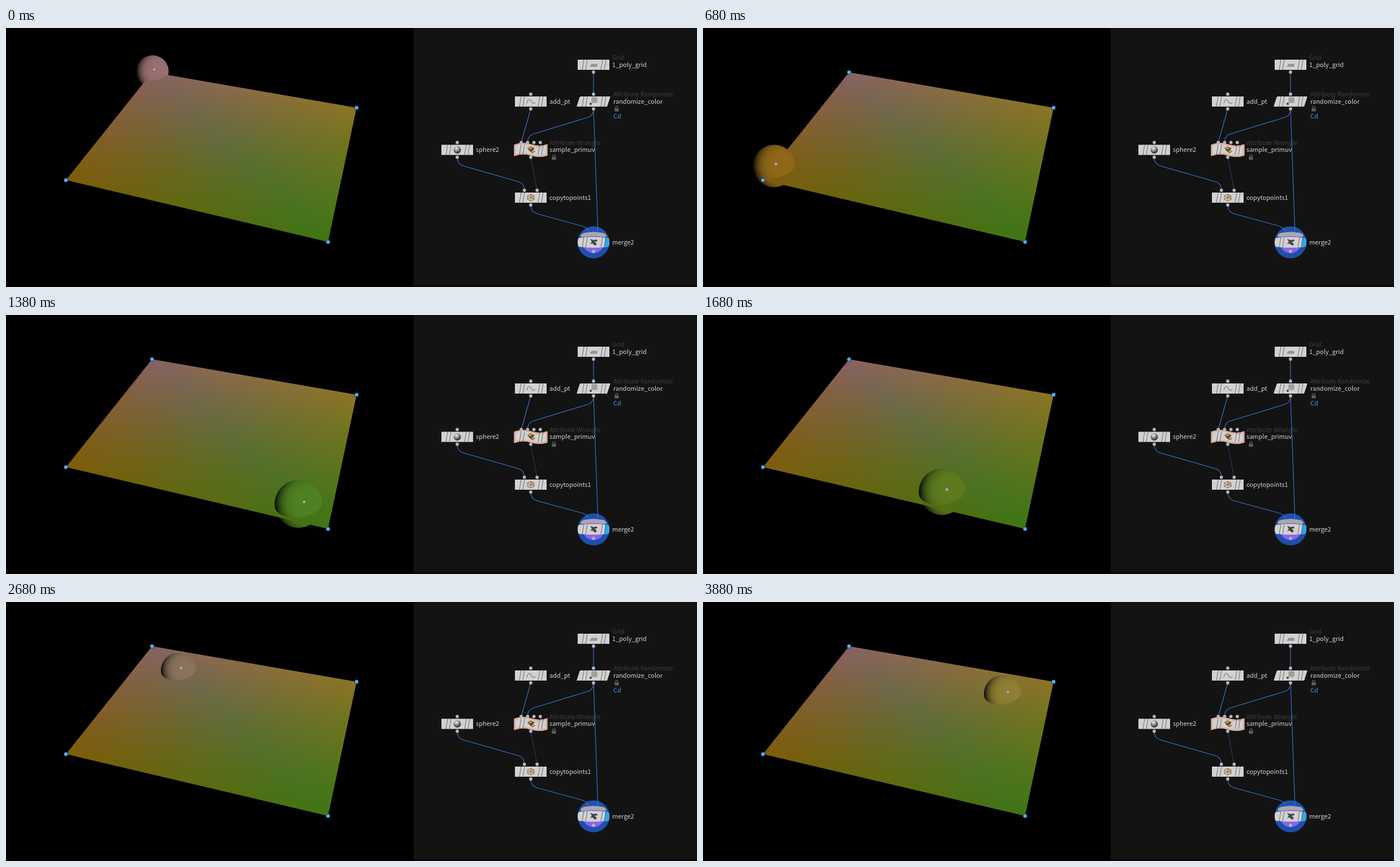
An HTML page with a canvas that plays this animation: 1222 px wide and 458 px high, repeating every 3980 ms.

```html
<!DOCTYPE html>
<html lang="en">
<head>
<meta charset="utf-8">
<title>Sampling a colour on a grid</title>
<style>
  html, body { margin: 0; width: 100%; height: 100%; overflow: hidden; background: #000; }
  canvas, svg { position: absolute; left: 0; top: 0; display: block; }
  text { font: 11px "Noto Sans CJK JP", "Noto Sans CJK SC", "Noto Sans", sans-serif; fill: #d2d2d2; }
  .type { fill: #3f3f3f; }
  .note { fill: #3f95ff; }
  .wire { fill: none; stroke: #3778d8; stroke-width: 1.1; }
  .dotted { stroke-dasharray: 1.5 2; }
  .body { fill: #d1d1d1; }
  .active .body { fill: #ffa51f; }
  .port { fill: #b4b4b4; }
  .line { fill: none; stroke: #000; stroke-opacity: .55; stroke-width: .9; }
</style>
</head>
<body>
<canvas id="view" width="721" height="458"></canvas>
<svg width="1222" height="458" viewBox="0 0 1222 458">
  <defs>
    <radialGradient id="ball" cx=".4" cy=".3" r=".7">
      <stop stop-color="#f4f4f4"/><stop offset=".5" stop-color="#888"/><stop offset="1" stop-color="#222"/>
    </radialGradient>
    <path id="ticks" class="line" d="M-17-9l-3 18M-11-9l-3 18M16-9l-3 18M22-9l-3 18"/>
    <g id="lock" fill="#5c5c5c">
      <rect x="-3.7" y="-1" width="7.4" height="5.4" rx=".7"/>
      <path d="M-2.3 0v-2a2.3 2.3 0 0 1 4.6 0v2" fill="none" stroke="#5c5c5c" stroke-width="1.2"/>
    </g>

    <rect id="box" class="body" x="-28" y="-9" width="56" height="18" rx=".6"/>
    <rect id="slanted" class="body" x="-27" y="-9" width="54" height="18" rx="1.5" transform="skewX(-18)"/>
    <g id="wavy">
      <path id="wave" d="M-28-8C-18-12-8-11 0-8.500S18-5 28-8V9C18 12 8 11 0 8.500S-18 6-28 9z" stroke="#e0a99c" stroke-width="3"/>
      <use href="#wave" stroke="#111" stroke-width="1"/>
      <path class="body" d="M-27-7C-18-11-8-10 0-7.500S18-4 27-7V8C18 11 8 10 0 7.500S-18 5-27 8z"/>
    </g>
    <g id="capsule">
      <path d="M-23-11Q-22-16-15-17Q0-19 15-17Q22-16 23-11Q22-9 18-9.500Q0-13-18-9.500Q-22-9-23-11z" fill="#a9a9a9"/>
      <path class="body" d="M-25-8Q0-11 25-8Q28-7 28 0T25 8Q0 11-25 8Q-28 7-28 0T-25-8z"/>
      <path d="M21-8.400L25-8Q28-7 28 0T25 8L19.500 8.500z" fill="#2da9ee"/>
    </g>

    <path id="plane" d="M-6 3l3-4h9v4z" fill="#999" stroke="#666" stroke-width=".6"/>
    <path id="curve" d="M-7 3C-4-7-1-4 1 0S6 5 8 1" fill="none" stroke="#777" stroke-width="1.2"/>
    <g id="cells">
      <path d="M-3-7h9v9h-9zM-3-4h9M0-7v9M3-7v9M-3-1h9" fill="#bbb" stroke="#777" stroke-width=".7"/>
      <circle cx="-5" cy="4" r="2" fill="#444"/>
    </g>
    <circle id="sphere" r="6.5" fill="url(#ball)"/>
    <g id="tool">
      <path d="M-6-3l5-3 8 3-3 3 4 3-5 3-5-4z" fill="#5b4a2d"/>
      <path d="M-5-3l4-2 4 2-4 2zM1 2l4-1 2 2-4 2z" fill="#d7a336"/>
    </g>
    <path id="cube" d="M0-6L6-3V3L0 6-6 3V-3zL6 3M6-3L-6 3M-6-3L6 3M0-6V6" fill="none" stroke="#8f6a2c"/>
    <path id="joint" d="M-6-6l6 2 6-1 1 3-5 1 4 4-3 3-5-4-4 1 3-4z" fill="#444"/>
  </defs>
  <rect x="721" width="501" height="458" fill="#131313"/>
  <rect x="721" y="454" width="501" height="4" fill="#0b0b0b"/>
  <circle cx="1039" cy="379" r="28.3" fill="#1d50ae"/>
  <circle cx="1039" cy="379" r="19" fill="#8a63ed"/>
  <g id="graph"></g>
</svg>
<script>
// ---- Node graph ----
const nodes = {
  grid: { x: 1039, y: 65, name: '1_poly_grid', type: 'Grid', shape: 'box', icon: 'plane', inputs: 0 },
  point: { x: 928, y: 130, name: 'add_pt', shape: 'box', icon: 'curve', inputs: 1 },
  random: { x: 1039, y: 130, name: 'randomize_color', type: 'Attribute Randomize', shape: 'slanted', icon: 'cells',
    inputs: 1, labelX: 35, locked: true, note: 'Cd' },
  sphere: { x: 798, y: 215.5, name: 'sphere2', shape: 'box', icon: 'sphere', inputs: 1 },
  sample: { x: 928, y: 215.5, name: 'sample_primuv', type: 'Attribute Wrangle', shape: 'wavy', icon: 'tool',
    inputs: 4, locked: true },
  copy: { x: 928, y: 300, name: 'copytopoints1', shape: 'box', icon: 'cube', inputs: 2, active: true },
  merge: { x: 1039, y: 379, name: 'merge2', shape: 'capsule', icon: 'joint', inputs: 2, spread: 32, plain: true }
};
const wires = [['grid', 'random', 0], ['point', 'sample', 0], ['random', 'sample', 1], ['sphere', 'copy', 0],
  ['sample', 'copy', 1, 'dotted'], ['copy', 'merge', 0], ['random', 'merge', 1]];

const inputAt = ({ x, y, inputs, spread = 45 }, i) => [x + (i - (inputs - 1) / 2) * spread / inputs, y - 13];
const outputAt = ({ x, y, plain }) => [x, y + (plain ? 16 : 13)];
const port = ([x, y]) => `<circle class="port" cx="${x}" cy="${y}" r="2.9"/>`;
const label = (x, y, text, style = '') => `<text class="${style}" x="${x}" y="${y}">${text}</text>`;

// Near wires run straight, far ones bend at both ends.
function wire([from, to, index, style = '']) {
  const [x1, y1] = outputAt(nodes[from]), [x2, y2] = inputAt(nodes[to], index);
  const bend = 13 * Math.sign(x2 - x1);
  const d = Math.abs(x2 - x1) < 20 ? `M${x1} ${y1}L${x2} ${y2}`
    : `M${x1} ${y1}q0 13 ${bend} 16L${x2 - bend} ${y2 - 16}Q${x2} ${y2 - 13} ${x2} ${y2}`;
  return `<path class="wire ${style}" d="${d}"/>`;
}

function nodeBody(node) {
  const parts = [node.shape, 'ticks', node.icon].map(id => `<use href="#${id}"/>`).join('');
  const inputs = node.plain ? [] : Array.from({ length: node.inputs }, (_, i) => inputAt(node, i));
  return `<g class="${node.active ? 'active' : ''}" transform="translate(${node.x} ${node.y})">${parts}</g>`
    + [...inputs, outputAt(node)].map(port).join('');
}

function nodeLabels({ x, y, name, note, locked, labelX = 33 }) {
  return label(x + labelX, y + 3.7, name)
    + (note ? label(x + labelX, y + 30, note, 'note') : '')
    + (locked ? `<use href="#lock" x="${x + 41}" y="${y + 13}"/>` : '');
}

const all = Object.values(nodes);
document.getElementById('graph').innerHTML = [
  ...all.map(n => n.type ? label(n.x + (n.labelX ?? 33), n.y - 8.7, n.type, 'type') : ''),
  ...wires.map(wire), ...all.map(nodeBody), ...all.map(nodeLabels)
].join('');

// ---- Grid in perspective ----
const canvas = document.getElementById('view');
const ctx = canvas.getContext('2d');

// Corners on screen and their colours, in the order uv = 00, 10, 11, 01.
const corners = [[258.3, 78.3], [620, 141], [569.5, 378.3], [106, 269]];
const tints = [[136, 98, 99], [140, 116, 36], [62, 117, 20], [126, 92, 10]];
const gridPath = new Path2D('M' + corners.join('L') + 'Z');

const [[ax, ay], [bx, by], [cx, cy], [dx, dy]] = corners;
const det = (bx - cx) * (dy - cy) - (dx - cx) * (by - cy);
const sx = ax - bx + cx - dx, sy = ay - by + cy - dy;
const g = (sx * (dy - cy) - (dx - cx) * sy) / det;
const h = ((bx - cx) * sy - sx * (by - cy)) / det;
const xu = bx - ax + g * bx, xv = dx - ax + h * dx;
const yu = by - ay + g * by, yv = dy - ay + h * dy;

function project(u, v) {
  const w = 1 + g * u + h * v;
  return [(xu * u + xv * v + ax) / w, (yu * u + yv * v + ay) / w, w];
}

function unproject(x, y) {
  const a = xu - g * x, b = xv - h * x, c = yu - g * y, d = yv - h * y;
  const p = x - ax, q = y - ay, k = a * d - b * c;
  return [(p * d - b * q) / k, (a * q - c * p) / k];
}

// The grid is shaded as two triangles that share the 00-11 diagonal.
function surfaceColor(u, v) {
  const lo = Math.min(u, v), hi = Math.max(u, v);
  const side = u > v ? tints[1] : tints[3];
  return side.map((s, i) => tints[0][i] * (1 - hi) + s * (hi - lo) + tints[2][i] * lo);
}

function paintSurface() {
  const layer = document.createElement('canvas');
  layer.width = canvas.width;
  layer.height = canvas.height;
  const layerCtx = layer.getContext('2d');
  const image = layerCtx.createImageData(layer.width, layer.height);
  for (let y = 70; y < 386; y++) {
    for (let x = 100; x < 626; x++) {
      const color = surfaceColor(...unproject(x + .5, y + .5));
      image.data.set([...color, 255], 4 * (y * layer.width + x));
    }
  }
  layerCtx.putImageData(image, 0, 0);
  return layer;
}
const surface = paintSurface();

// ---- Motion: one coordinate is dragged at a time, seen in held steps ----
const LOOP = 3980;
const drags = [
  { axis: 'v', begin: 100, first: 200, last: 680, to: .88 },
  { axis: 'u', begin: 1004, first: 1180, last: 1380, to: .9 },
  { axis: 'u', begin: 1570, first: 1580, last: 1880, to: .207 },
  { axis: 'v', begin: 2070, first: 2280, last: 2680, to: .168 },
  { axis: 'u', begin: 3200, first: 3380, last: 3880, to: .818, step: 200 }
];
const smooth = p => p * p * (3 - 2 * p);

function positionAt(time) {
  const uv = { u: 0, v: -.035 };
  for (const { axis, begin, first, last, to, step = 100 } of drags) {
    if (time < first) break;
    const held = time >= last ? last : time - (time - first) % step;
    uv[axis] += (to - uv[axis]) * smooth((held - begin) / (last - begin));
  }
  return uv;
}

// ---- Drawing ----
function dot(x, y, r, fill) {
  ctx.beginPath();
  ctx.arc(x, y, r, 0, 7);
  ctx.fillStyle = fill;
  ctx.fill();
}

// Lit from the right, falling off steeply at the left rim.
function sphereFill(color, r) {
  const fill = ctx.createRadialGradient(.45 * r, 0, 0, .45 * r, 0, 1.46 * r);
  for (let s = 0; s <= 1; s += 1 / 16) {
    fill.addColorStop(s, `rgb(${color.map(c => Math.round(c * 1.12 * (1 - s ** 5)))})`);
  }
  return fill;
}

// Draws the whole sphere, or only the part above the grid plane.
function drawSphere(x, y, r, color, aboveOnly) {
  ctx.save();
  ctx.translate(x, y);
  ctx.rotate(-.13);
  ctx.beginPath();
  ctx.arc(0, 0, r, Math.PI, 2 * Math.PI);
  ctx.ellipse(0, 0, r, aboveOnly ? r * .56 : r, 0, 0, Math.PI);
  ctx.fillStyle = sphereFill(color, r);
  ctx.fill();
  ctx.restore();
}

function draw(time) {
  const { u, v } = positionAt(time);
  const [px, py, w] = project(u, v);
  const sphere = [px - 3.3 - 7.5 * u, py + 3.8, 28.8 / w ** 1.15, surfaceColor(u, Math.max(v, 0))];

  ctx.fillStyle = '#000';
  ctx.fillRect(0, 0, canvas.width, canvas.height);
  drawSphere(...sphere, false);
  ctx.save();
  ctx.clip(gridPath);
  ctx.drawImage(surface, 0, 0);
  ctx.restore();
  for (const [x, y] of corners) {
    dot(x, y, 3.9, '#16304f');
    dot(x, y, 3.1, '#52b0ea');
  }
  drawSphere(...sphere, true);
  dot(px, py, 3.4, 'rgba(90,75,75,.6)');
  dot(px, py, 2.7, '#b39c9e');
}

function tick(now) {
  draw(now % LOOP);
  requestAnimationFrame(tick);
}
draw(0);
requestAnimationFrame(tick);
</script>
</body>
</html>
```
